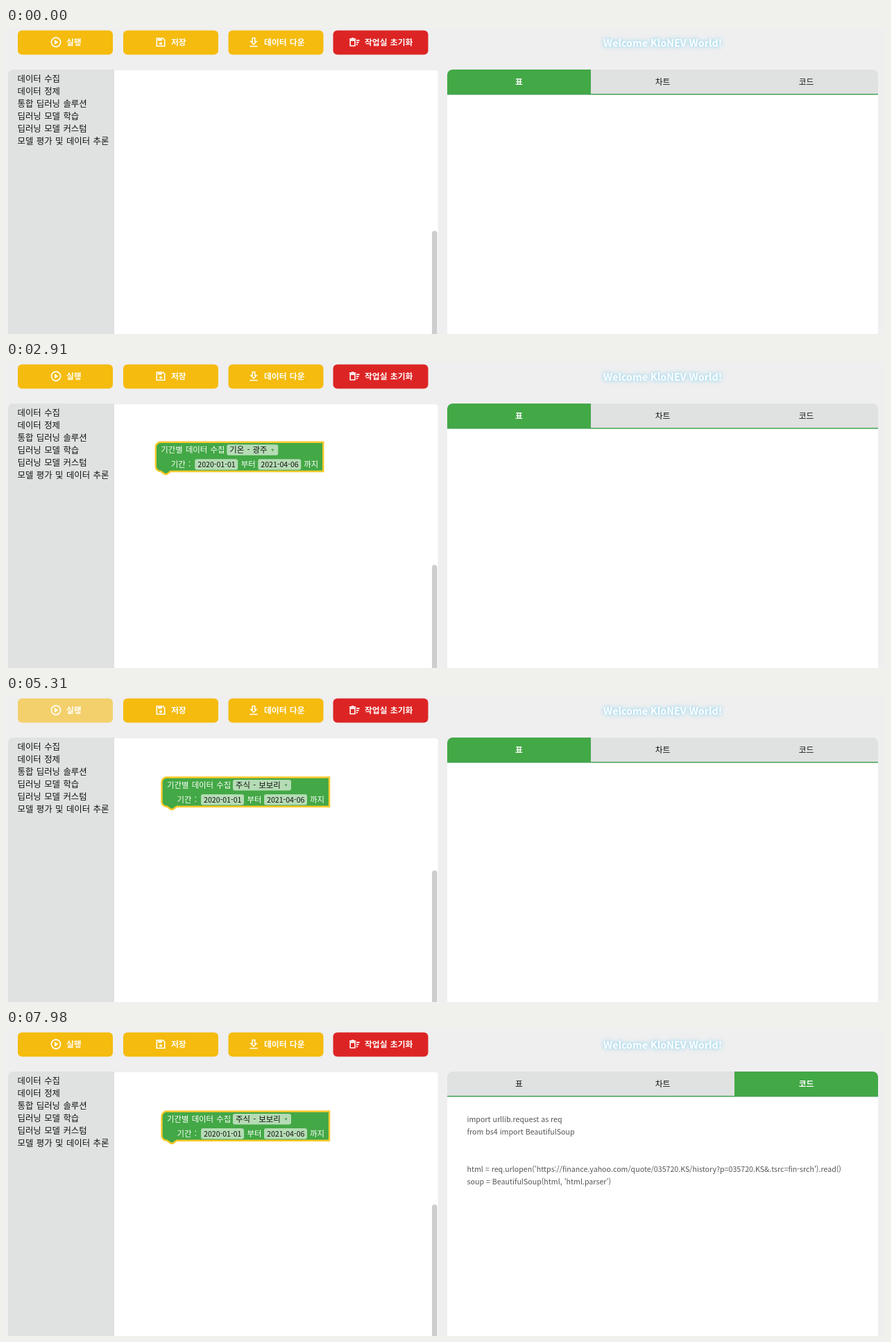
Write an HTML page that moves like this. It is 1267 px wide and 442 px high and loops after 8 s.

```html
<!DOCTYPE html>
<html lang="ko">
<head>
<meta charset="utf-8">
<style>
html, body { margin: 0; width: 100%; height: 100%; overflow: hidden; background: #efefef; }
svg { display: block; width: 1267px; height: 442px; word-spacing: 1px; font-family: "Noto Sans CJK KR", "Noto Sans CJK", "Noto Sans KR", sans-serif; }
#title, #code { word-spacing: 0; }
#title { filter: drop-shadow(0 0 2px #a5d8ee) drop-shadow(0 0 3px #b4e0f2); }
#menu { filter: drop-shadow(0 0 2px rgba(0,0,0,.3)); }
</style>
</head>
<body>
<svg id="stage" viewBox="0 0 1267 442"></svg>
<script>
const LOOP = 8000, TICK = 30;
const GREEN = [67, 168, 70], GRAY = [224, 225, 225];
const rgb = c => `rgb(${c.map(Math.round)})`;
const mix = (a, b, p) => rgb(a.map((v, i) => v + (b[i] - v) * p));
const green = rgb(GREEN), gray = rgb(GRAY);

// Markup helpers; text is placed by its vertical centre.
const text = (x, cy, s, size = 11.4, fill = '#fff', more = '') =>
  `<text x="${x}" y="${cy + size * .37}" font-size="${size}" fill="${fill}" xml:space="preserve" ${more}>${s}</text>`;
const rect = (x, y, w, h, fill, more = '') =>
  `<rect x="${x}" y="${y}" width="${w}" height="${h}" fill="${fill}" ${more}/>`;
const group = (id, body, more = '') => `<g id="${id}" ${more}>${body}</g>`;
const MID = 'text-anchor="middle"';

const icons = [
  '<circle r="6.6"/><path d="M-2-3.4 3.4 0-2 3.4z" fill="#fff" stroke="none"/>',
  '<path d="M-5.7-5.7H3.2L5.7-3.2V5.7H-5.7z"/><path d="M-4-3.4H2" stroke-width="2.6"/><circle cy="2" r="2" fill="#fff" stroke="none"/>',
  '<path d="M-1.8-6H1.8V-1H4L0 3.2-4-1H-1.8zM-5.8 6H5.8" stroke-width="1.5"/>',
  '<path d="M-5.8-2.6H1V5.2H-5.8zM-7-4.6H2.2M-4-5.6H-.8"/><path d="M3-2.6H7.6M3 .4H6.6M3 3.4H5"/>'
];
const button = (x, w, label, i, fill) =>
  rect(x, 3.5, w, 35, fill, `rx="6" id="btn${i}"`) +
  `<g transform="translate(${[72, 223, 357, 502][i]} 20.5)" fill="none" stroke="#fff" stroke-width="1.6">${icons[i]}</g>` +
  text([87, 238, 372, 517][i], 20.5, label, 11.8, '#fff', 'font-weight="700"');

const blockPath = (x, y, w, h, tab) =>
  `M${x + 7} ${y}H${x + w}V${y + h}` +
  (tab ? `H${x + 21.5}l-5.5 4h-3l-5.5-4` : '') +
  `H${x + 7}a7 7 0 0 1-7-7V${y + 7}a7 7 0 0 1 7-7z`;
const block = (x, y, w, h, tab = true, more = '') =>
  `<path d="${blockPath(x, y, w, h, tab)}" fill="${green}" ${more}/>`;
const field = (x, y, w, label, id = '', size = 11.4, arrow = false) =>
  rect(x, y, w, 15.5, '#b5dcb5', `rx="3" id="${id}"`) +
  text(x + 4, y + 8, label, size, '#111', `id="${id}Label"`) +
  (arrow ? `<path id="${id}Arrow" transform="translate(${x + w - 8} ${y + 8})" d="M-2-1.5H2L0 1.8z" fill="#4b944d"/>` : '');

const period = group('period',
  block(168.5, 106.5, 241.5, 42.2, true, 'id="periodShape" stroke-width="2.4"') +
  text(176, 117.5, '기간별 데이터 수집') + field(271, 110, 74, '기온 - 광주', 'kind', 11.4, true) +
  text(190.5, 139, '기간 :') + field(225, 131, 62, '2020-01-01', 'from', 10.6) +
  text(291.5, 139, '부터') + field(316, 131, 62, '2021-04-06', 'to', 10.6) + text(382, 139, '까지'));

const topics = ['데이터 수집', '데이터 정제', '통합 딥러닝 솔루션', '딥러닝 모델 학습', '딥러닝 모델 커스텀', '모델 평가 및 데이터 추론'];
const toolbox =
  '<path d="M3 442V67a7 7 0 0 1 7-7H156V442z" fill="#e0e1e1"/>' +
  rect(3, 64, 153, 15, '#bbb', 'id="row0"') + rect(3, 82, 153, 18, '#e6e7e7', 'id="row1"') +
  topics.map((s, i) => text(16.5, 73 + 18 * i, s, 12.4, '#111', `id="topic${i}"`)).join('');

const flyout = group('flyout',
  '<path d="M157 60H419a6 6 0 0 1 6 6V442H157z" fill="#e3e4e4"/>' + rect(156, 61, 1, 381, '#f6f6f6') +
  block(168.5, 67.5, 181, 21.5, false) + text(176, 78, '실시간 데이터 수집') + field(271, 70, 74, '기온 - 광주', 'live', 11.4, true) +
  block(168.5, 170, 198.5, 21.5) + text(176, 180.5, '데이터 입력') + field(235.5, 173, 127, '.csv 파일을 선택해주세요', 'file', 11.2) +
  block(168.5, 212, 158.5, 21.5) + text(176, 222.5, '저장된 데이터 선택') + field(271, 215, 52, '누벨라', 'saved', 11.4, true));

const choices = ['기온 - 광주', '기온 - 구미', '기온 - 대전', '기온 - 서울', '주식 - 누리움', '주식 - 모람전자', '주식 - 다솔', '주식 - 라온디움', '주식 - 보보리', '주식 - 누벨라'];
const menu = group('menu',
  '<path d="M314 146.5H355.5L364 138.5 372.5 146.5H413a2 2 0 0 1 2 2V360a2 2 0 0 1-2 2H314a2 2 0 0 1-2-2V148.5a2 2 0 0 1 2-2z" fill="#fff"/>' +
  rect(315, 149.5, 97, 20.5, '#e5e5e5', 'id="pick"') +
  '<path d="M320 160l2 2.6 4-6" fill="none" stroke="#111" stroke-width="1.4"/>' +
  choices.map((s, i) => text(335, 160 + 21 * i, s, 9.8, '#222')).join(''));

// Result table: trading days from 2 January 2020 with seeded prices.
function table() {
  const x = 751, w = 195.5, top = 214.8, step = 14.42, rows = 16;
  let out = text(947, 149.5, '데이터 수집 결과', 13, '#777', MID + ' word-spacing="2"') +
    rect(x, 189, 2 * w, 25, '#808080') + rect(x, 189, 2 * w, 1, '#222') + rect(x, 214, 2 * w, 1, '#222') +
    text(x + w / 2, 202.5, 'Date', 9, '#fff', MID + ' font-weight="700"') +
    text(x + w * 1.5, 202.5, 'Close', 9, '#fff', MID + ' font-weight="700"');
  const day = new Date(Date.UTC(2020, 0, 2));
  let seed = 7, price = 30500;
  for (let i = 0; i < rows; i++) {
    while (day.getUTCDay() % 6 === 0) day.setUTCDate(day.getUTCDate() + 1);
    seed = seed * 73 % 101;
    price += (seed - 42) * 10;
    const cy = top + step * i + 8;
    out += text(x + w / 2, cy, day.toISOString().slice(0, 10), 8.6, '#333', MID) +
      text(x + w * 1.5, cy, price, 8.6, '#333', MID) +
      rect(x, Math.round(top + step * (i + 1)), 2 * w, 1, '#222');
    day.setUTCDate(day.getUTCDate() + 1);
  }
  return out + [0, 1, 2].map(i => rect(Math.floor(x + w * i), 189, 1, 256, '#222')).join('');
}

const code = [
  [129.5, 'import urllib.request as req'],
  [147.5, 'from bs4 import BeautifulSoup'],
  [201.5, "html = req.urlopen('https://finance.yahoo.com/quote/035720.KS/history?p=035720.KS&amp;.tsrc=fin-srch').read()"],
  [219.5, "soup = BeautifulSoup(html, 'html.parser')"]
];
const tabs = ['표', '차트', '코드'];

document.getElementById('stage').innerHTML =
  `<defs><clipPath id="paneClip">${rect(636, 60, 621, 382, '#000')}</clipPath>` +
  `<clipPath id="tableClip">${rect(636, 97, 528, 343, '#000', 'id="tableBox"')}</clipPath>` +
  `<clipPath id="tabClip">${rect(636, 60, 621, 60, '#000', 'rx="8"')}</clipPath></defs>` +
  rect(0, 0, 1267, 442, '#efefef') +
  button(17, 137, '실행', 0, '#f5bb0e') + button(169, 137, '저장', 1, '#f5bb0e') +
  button(320.5, 137, '데이터 다운', 2, '#f5bb0e') + button(471.5, 137, '작업실 초기화', 3, '#dd2424') +
  rect(16.5, 3.5, 137.5, 35, 'none', 'id="focus" rx="1.5" stroke="#77705a"') +
  text(946.5, 22, 'Welcome KloNEV World!', 14.3, '#fff', MID + ' id="title" font-weight="700"') +
  group('spinner', Array.from({ length: 7 }, (_, i) => {
    const a = -i * Math.PI / 6;
    return `<circle cx="${13 * Math.cos(a)}" cy="${13 * Math.sin(a)}" r="${2.5 - i * .06}" fill="#27aed2" opacity="${[1, .95, .9, .8, .55, .2, .1][i]}"/>`;
  }).join('')) +
  rect(140, 61, 482.5, 400, '#fff', 'rx="4"') + toolbox +
  rect(614, 293, 7.5, 170, '#cecece', 'rx="3.7" id="bar"') +
  flyout + period + menu +
  `<g clip-path="url(#paneClip)">${group('pane', rect(636, 96, 621, 346, '#fff'))}` +
  `<g clip-path="url(#tableClip)">${group('table', table())}</g>` +
  group('code', code.map(([y, s]) => text(664.5, y, s, 10.65, '#555')).join('')) + '</g>' +
  `<g clip-path="url(#tabClip)">${tabs.map((s, i) =>
    rect(636 + 207 * i, 60, 207, 36, gray, `id="tab${i}"`) + text(739.5 + 207 * i, 78, s, 11.8, '#111', `${MID} id="tabText${i}"`)).join('')}` +
  rect(636, 95, 621, 1.5, '#43a054') + '</g>';

const el = {};
document.querySelectorAll('[id]').forEach(n => el[n.id] = n);
const set = (id, o) => { for (const k in o) el[id].setAttribute(k, o[k]); };
const show = (id, on) => set(id, { opacity: +on });
const span = (t, a, b) => Math.min(1, Math.max(0, (t - a) / (b - a)));
const smooth = p => p * p * (3 - 2 * p);
const within = (t, a, b) => t >= a && t < b;
const outline = (id, on) => set(id, { stroke: on ? '#fff' : 'none', 'stroke-width': 1.6 });

function render(time) {
  const t = Math.floor(time / TICK) * TICK;

  // Toolbox and flyout
  const open = within(t, 1680, 2760);
  set('row0', { fill: open ? '#bbb' : '#e6e7e7', opacity: +(open || within(t, 1080, 1680)) });
  show('row1', within(t, 1020, 1080));
  set('topic0', { fill: open ? '#fff' : '#111', 'font-weight': open ? 700 : 400 });
  show('flyout', open);
  outline('live', within(t, 1920, 2010));

  // Block being dragged and edited
  const drag = smooth(span(t, 2730, 2970));
  const done = t >= 4740;
  show('period', t >= 1680);
  set('period', { transform: `translate(${56 * drag} ${11 * drag})` });
  set('periodShape', { stroke: t >= 2190 ? '#fbca2c' : 'none' });
  outline('kind', within(t, 2010, 2070) || within(t, 3270, 3840));
  outline('from', within(t, 2100, 2400));
  set('kind', { width: done ? 84 : 74 });
  set('kindArrow', { transform: `translate(${done ? 347.5 : 337} 118)` });
  el.kindLabel.textContent = choices[done ? 8 : 0];
  set('bar', { y: t >= 3120 ? 252 : 293, height: 210 });

  // Dropdown
  const p = span(t, 3570, 3840), drop = 1 - (1 - p) ** 2;
  set('menu', { opacity: within(t, 3600, 4740) ? drop : 0, transform: `translate(0 ${-5 * (1 - drop)})` });
  const pick = t >= 4410 ? 8 : Math.round(7 * smooth(span(t, 3840, 4200)));
  set('pick', { y: 149.5 + 21 * pick });

  // Run button, loader and heading
  const hover = smooth(span(t, 5100, 5400)) - smooth(span(t, 5940, 6180));
  const busy = within(t, 5760, 6900);
  set('btn0', { fill: mix([245, 187, 14], [242, 214, 132], hover), rx: within(t, 5760, 7410) ? 1.5 : 6 });
  show('focus', within(t, 5760, 7410));
  show('title', !busy);
  show('spinner', busy);
  set('spinner', { transform: `translate(995 20) rotate(${150 + (Math.min(t, 6180) - 5940) * .3})` });

  // Result pane slides out, the code pane takes its place
  const out = span(t, 7380, 7650), back = 1 - span(t, 7650, 7770);
  const s = t < 7650 ? out : back;
  const dx = Math.round(618 * s);
  set('pane', { transform: `translate(${dx} 0)` });
  set('table', { opacity: t < 7650 ? span(t, 6030, 6180) : 0, transform: `translate(${dx} 0)` });
  set('tableBox', { width: 528 - 198 * s, height: 343 - 85 * s });
  set('code', { opacity: t >= 7980 ? 1 : t >= 7950 ? .6 : 0 });

  // Tabs
  const turn = smooth(span(t, 7380, 7710));
  const hot = t >= 7290, swapped = t >= 7410;
  set('tab0', { fill: mix(GREEN, GRAY, turn) });
  set('tab2', { fill: mix(GRAY, GREEN, turn) });
  set('tabText0', { fill: swapped ? '#111' : '#fff', 'font-weight': swapped ? 400 : 700 });
  set('tabText2', { fill: hot ? '#fff' : '#111', 'font-weight': hot ? 700 : 400 });
}

const start = performance.now();
function loop(now) {
  render(Math.max(0, now - start) % LOOP);
  requestAnimationFrame(loop);
}
render(0);
requestAnimationFrame(loop);
</script>
</body>
</html>
```
